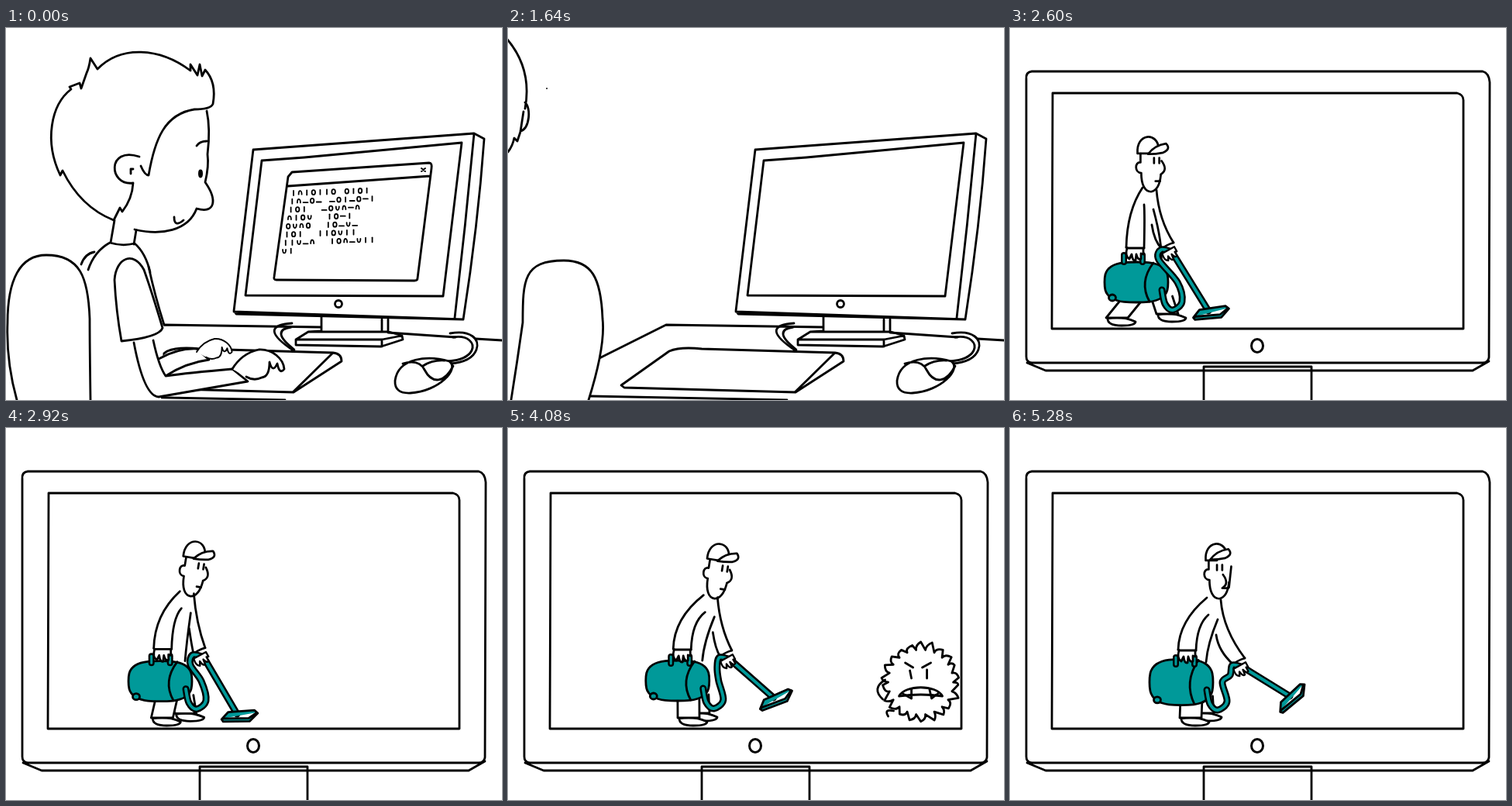
An HTML page with a canvas that plays this animation: 640 by 480 pixels, repeating every 5800 ms.

```html
<!DOCTYPE html>
<html lang="en">
<head>
<meta charset="utf-8">
<title>Cleaning the screen</title>
<style>
  html, body { margin: 0; width: 100%; height: 100%; overflow: hidden; background: #fff; }
  canvas { display: block; width: 640px; height: 480px; }
</style>
</head>
<body>
<canvas id="stage" width="640" height="480"></canvas>
<script>
const ctx = document.getElementById('stage').getContext('2d');
const LOOP = 5800, TEAL = '#009999', INK = '#000', PAPER = '#fff';

const span = (t, a, b) => Math.max(0, Math.min(1, (t - a) / (b - a)));
const ease = k => k * k * (3 - 2 * k);
const lerp = (a, b, k) => Array.isArray(a) ? a.map((v, i) => lerp(v, b[i], k)) : a + (b - a) * k;
const blend = (a, b, k) =>
  Object.fromEntries(Object.keys(a).map(key => [key, lerp(a[key], b[key], k)]));
const at = (p, dx, dy) => [p[0] + dx, p[1] + dy];
const seeded = n => Math.abs(Math.sin(n * 127.1) * 43758.5) % 1;

// ---- Drawing helpers ----

function paint(path, fill, width = 2.8, color = INK) {
  if (fill) { ctx.fillStyle = fill; ctx.fill(path); }
  if (!width) return;
  ctx.lineWidth = width;
  ctx.strokeStyle = color;
  ctx.stroke(path);
}
const ink = (d, ...style) => paint(new Path2D(d), ...style);
const bend = (a, control, b) => ink(`M${a} Q${control} ${b}`);

function smooth(pts, closed) {
  const path = new Path2D(), n = pts.length;
  const get = i => closed ? pts[(i + n) % n] : pts[Math.max(0, Math.min(n - 1, i))];
  path.moveTo(...pts[0]);
  for (let i = 0; i < (closed ? n : n - 1); i++) {
    const [a, b, c, d] = [-1, 0, 1, 2].map(j => get(i + j));
    path.bezierCurveTo(b[0] + (c[0] - a[0]) / 6, b[1] + (c[1] - a[1]) / 6,
      c[0] - (d[0] - b[0]) / 6, c[1] - (d[1] - b[1]) / 6, ...c);
  }
  return path;
}
function oval(x, y, rx, ry, ...style) {
  const path = new Path2D();
  path.ellipse(x, y, rx, ry, 0, 0, 7);
  paint(path, ...style);
}
function tube(path, width = 9) {
  paint(path, null, width);
  paint(path, null, width - 5, TEAL);
}
function place([x, y], draw, angle = 0, sx = 1, sy = sx) {
  ctx.save();
  ctx.translate(x, y);
  ctx.rotate(angle);
  ctx.scale(sx, sy);
  draw();
  ctx.restore();
}
function zoomAbout(k, x, y) {
  ctx.translate(x, y);
  ctx.scale(k, k);
  ctx.translate(-x, -y);
}

// ---- Desk ----

function desk() {
  ink('M118 426 L204 383 L406 386 M493 393 L580 399 M606 401 L640 403 M106 475 L360 480');
  ink('M319 157 L604 136 L617 143 Q609 255 590 376 L297 369 L294 365 Z M604 136 Q593 255 579 374 M294 366 L590 376');
  ink('M330 171 L385 167 L588 148 L564 346 L309 345 Z');
  oval(429, 356, 4.5, 4.5);
  ink('M407 373 V391 M485 376 V391 M493 376 V392 M407 391 L390 392 L374 402 V409 L484 411 L512 402 L511 397 L494 392 H392 M374 402 H485 V411 M485 402 L511 397');
  bend([369, 381], [322, 384], [372, 417]);
  bend([368, 386], [340, 390], [372, 415]);
  ink('M146 461 L208 417 Q222 411 250 414 L422 419 Q433 420 433 430 L371 470 L150 464 Z M422 419 L370 470', PAPER);
  ink('M573 394 C600 389 612 402 607 415 Q601 431 573 433 M577 399 C597 396 605 407 601 416 Q595 428 571 430');
  ink('M502 455 C506 425 545 422 572 430 C586 440 558 469 522 471 Q501 472 502 455 Z M512 433 Q533 427 540 441 C550 460 566 458 577 436 M538 436 Q550 428 566 429', PAPER);
}

const ROWS = ['InIoIIo oIoI', 'In_o_ _oI_o-I', 'IoI  _oun-n', 'nIou  Io-I', 'ouno  Io_u_',
  'IoI  IIouII', 'IIu_n  Ion_uII', 'uIoI  o_  I', 'oI_oo  III  Io'];
const MARKS = {
  I: 'M0 -3 V3', o: 'M0 -3 C3 -3 3 3 0 3 C-3 3 -3 -3 0 -3',
  n: 'M-2 2 C-2 -4 2 -4 2 2', u: 'M-2 -2 C-2 4 2 4 2 -2', _: 'M-3 2 H3', '-': 'M-3 0 H3'
};
function codeWindow(t) {
  if (t >= 1240) return;
  ctx.save();
  zoomAbout(1 + 0.09 * span(t, 1080, 1200), 450, 250);
  ink('M369 186 L546 174 Q550 174 549 181 L531 323 Q531 326 527 326 L349 325 Q345 325 346 321 L364 192 Z M364 204 L547 191', PAPER);
  ink('M536 181 L541 185 M541 181 L536 185', null, 2);
  let left = ROWS.slice(0, 7).join('').length + 2 + Math.floor(23 * span(t, 80, 640));
  ROWS.forEach((row, r) => [...row].forEach((ch, i) => {
    if (left-- > 0 && ch !== ' ')
      place([371 - 1.7 * r + 8.6 * i, 213 + 10.7 * r - 0.3 * i], () => ink(MARKS[ch], null, 1.8));
  }));
  ctx.restore();
}

function boyHead() {
  ink('M139 248 Q96 231 73 184 L70 190 C49 146 58 99 84 79 L82 76 L95 71 L97 78 L104 58 Q107 52 109 39 L118 53 C148 22 198 25 238 55 L238 47 L247 61 L250 47 L253 62 L257 54 Q272 70 267 98 Q264 105 243 105 C205 111 192 143 184 190 Q179 190 174 178');
  ink('M172 166 C130 152 132 204 164 200 Q163 220 150 237 L147 232 L139 248 M164 182 H161 V188');
  ink('M259 107 Q264 130 260 163 Q262 178 257 199 C273 222 270 240 246 233 C235 262 200 268 166 260');
  ink('M246 152 Q250 146 259 146 M217 244 Q217 258 229 248');
  oval(251, 188, 1.6, 4, INK);
}
function hand() {
  ink('M0 0 Q12 -20 34 -25 C52 -26 66 -13 67 0 Q61 8 58 -7 Q52 6 48 -9 Q48 10 38 11 Q28 16 18 10', PAPER);
}
const REACH = { head: [0, 0], shirt: [0, 0], sleeve: [0, 0], wrist: [292, 440], bendHand: 0 };
const PRESS = { head: [-13, 0], shirt: [-6, -1], sleeve: [-1, 3], wrist: [287, 420], bendHand: 0.3 };

function boy(t) {
  const lean = ease(span(t, 760, 960)), pose = blend(REACH, PRESS, lean);
  const tap = t >= 80 && t < 640 && Math.floor(t / 80) % 2 ? 4 : 0;
  const wrist = at(pose.wrist, 0, tap);
  ink('M106 312 L134 277 H166 L184 308 L204 383 L200 480 H100 Z', PAPER, 0);
  place(pose.shirt, () => {
    ink('M106 312 Q114 288 134 277 Q150 282 166 278 Q180 290 186 315 M97 305 Q102 291 114 289 M140 248 L135 277 M168 261 L165 279');
  });
  bend([184, 308], [192, 345], [204, 383]);
  if (lean < 0.5) {
    ink('M197 427 Q222 413 246 414 L262 428 Q232 432 206 449', PAPER);
    place([246, 418 - tap], hand, 0, 0.68);
  } else {
    bend([200, 424], [222, 412], [285, 415]);
    ink('M332 447 L340 437 H359 L351 448 Z', INK, 1);
  }
  ink(`M165 406 Q178 475 197 476 Q250 467 ${at(wrist, 20, 16)} L${wrist} Q235 445 206 449 Q197 436 190 403`, PAPER);
  place(wrist, hand, pose.bendHand);
  place(pose.sleeve, () =>
    ink('M149 404 Q142 365 140 325 C142 296 165 287 178 312 Q188 340 202 387 Q198 399 149 404 Z', PAPER));
  place(at(pose.head, tap / 2, 0), boyHead);
}
function leavingBoy() {
  ink('M-5 10 Q32 50 22 104 M22 96 C30 103 28 130 16 133 M20 108 L16 134 L12 146 L8 142 Q6 152 0 160 M-8 160 V480');
}
function chair(k) {
  const left = lerp(2, 19, k), right = lerp(108, 122, k), top = lerp(293, 300, k);
  ink(`M${lerp(14, 4, k)} 480 Q${lerp(0, 12, k)} 430 ${left} 380
    C${left} 325 ${lerp(18, 20, k)} ${top} ${lerp(52, 72, k)} ${top}
    C${lerp(96, 108, k)} ${top} ${lerp(106, 120, k)} 322 ${right} 375
    Q${lerp(108, 126, k)} 410 ${lerp(109, 104, k)} 480`, PAPER);
}

function deskScene(t) {
  ctx.save();
  const zoom = ease(span(t, 1720, 1960)), go = span(t, 1360, 1520);
  ctx.translate(-135 * zoom, -15 * zoom);
  zoomAbout(1 + 1.1 * zoom, 455, 250);
  desk();
  codeWindow(t);
  if (t < 1520) {
    place([-160 * go, -60 * go], () => boy(t));
  } else if (t < 1720) {
    place([1640 - t, 0], leavingBoy);
    oval(50, 78, 0.5, 0.5, INK, 1);
  }
  chair(go);
  ctx.restore();
}

// ---- Cleaner: a jointed figure ----

const WALK = {
  head: [181, 187], tilt: 0, turn: 0, shoulder: [171, 206], grip: [161, 287], farGrip: [205, 289],
  bag: [163, 328], plump: 1, nozzle: [259, 368], aim: -0.12, foot: [144, 379], farFoot: [209, 374]
};
const STOOP = {
  head: [271, 196], tilt: 0.24, turn: 0, shoulder: [251, 213], grip: [222, 289], farGrip: [274, 299],
  bag: [217, 326], plump: 1, nozzle: [322, 374], aim: 0, foot: [239, 379], farFoot: [252, 373]
};
const AIM = {
  ...STOOP, head: [267, 196], tilt: 0.06, shoulder: [254, 219], grip: [227, 289], farGrip: [294, 299],
  bag: [221, 326], nozzle: [375, 322], aim: -0.88
};
const REST = {
  ...AIM, head: [269, 196], tilt: 0, turn: 1, grip: [228, 290], farGrip: [297, 309],
  bag: [221, 328], plump: 1.14, nozzle: [364, 349], aim: -0.72, farFoot: [255, 373]
};

function cleanerHead(turn) {
  ink('M-13 -26 V-14 C-21 -15 -21 0 -12 0 C-12 16 -7 25 1 25 Q12 23 14 3');
  if (turn > 0.5) ink('M17 -18 L14 10');
  place([-9 * turn, 9 * turn], () => ink('M15 -16 Q24 -4 14 2'));
  place([-7 * turn, 0], () => ink('M5 -20 V-13 M12 -20 V-13'));
  ink('M7 11 L13 11');
  ink('M-17 -26 C-19 -54 10 -54 11 -33 M-17 -26 H-2', PAPER);
  place([-8 * turn, -2 * turn], () =>
    ink('M-3 -25 Q6 -37 21 -39 Q28 -32 17 -27 Q8 -25 -3 -25 Z', PAPER));
}
function fist() {
  ink('M-10 -3 Q-13 8 -7 11 L-4 5 Q-3 14 1 13 L2 5 Q4 13 8 11 L8 4 L11 5 V-3 Z', PAPER);
}
function leg(hipX, hipY, foot, half) {
  place(foot, () => ink('M-18 -4 Q0 -8 18 0 Q18 5 0 5 Q-18 5 -18 -4 Z', PAPER));
  ink(`M${hipX - half} ${hipY} L${at(foot, -6 - half, -5)} H${foot[0] - 6 + half} L${hipX + half} ${hipY}`, PAPER);
}
function bagBody(plump) {
  const round = v => Math.sign(v) * Math.abs(v) ** 0.7, rim = [];
  for (let i = 0; i < 24; i++) {
    const a = i * Math.PI / 12;
    rim.push([41 * round(Math.cos(a)), 26 * plump * round(Math.sin(a))]);
  }
  paint(smooth(rim, true), TEAL);
  bend([22, -25 * plump], [3, 0], [17, 25 * plump]);
  oval(-31, 20 * plump, 4.5, 4, TEAL);
}

function cleaner(p) {
  const { shoulder, grip, farGrip, bag, nozzle } = p;
  const front = at(shoulder, 18, 3), port = at(bag, 33, 10);
  leg((bag[0] + 25 + p.farFoot[0] - 6) / 2, bag[1] + 18, p.farFoot, 14);
  leg((bag[0] + 14 + p.foot[0] - 6) / 2, bag[1] + 22, p.foot, 14);

  const cuff = at(grip, -11, -4), innerCuff = at(grip, 12, -3);
  bend(shoulder, at([cuff[0], shoulder[1]], 1, 30), cuff);
  bend(at(shoulder, 2, 22), at([innerCuff[0], shoulder[1]], 1, 35), innerCuff);
  bend(cuff, at(grip, 0, 4), innerCuff);
  const farCuff = at(farGrip, 6, -12), farInner = at(farGrip, -9, -4);
  bend(front, at(front, 3, 38), farCuff);
  bend(at(front, -6, 45), at(front, -3, 66), farInner);
  bend(farCuff, at(farGrip, -4, -9), farInner);
  bend(at(front, -4, 25), at(bag, 34, -50), at(bag, 32, -26));

  place(bag, () => bagBody(p.plump));
  for (const dx of [-14, 10]) tube(smooth([at(grip, dx, 15), at(grip, dx, 6)]), 8);
  place(grip, fist);
  tube(smooth([port, at(port, 4, 18), at(port, 14, 26), at(port, 26, 15), at(port, 20, -10),
    at(farGrip, -13, 10), at(farGrip, -10, -3), at(farGrip, 4, 0)]));
  tube(smooth([at(farGrip, 4, 0), at(nozzle, -3, -3)]));
  place(nozzle, () =>
    ink('M-23 3 L-14 -6 L20 -7 L24 -3 L13 7 L-21 6 Z M-21 2 L12 3 L23 -4', TEAL), p.aim);
  place(farGrip, fist, -0.5, 0.85);
  place(p.head, () => cleanerHead(p.turn), p.tilt, 0.97);
}

function cleanerPose(t) {
  if (t >= 5080) return blend(AIM, REST, ease(span(t, 5080, 5280)));
  if (t >= 3840) return blend(STOOP, AIM, ease(span(t, 3840, 4360)));
  const pose = blend(WALK, STOOP, span(t, 2600, 3080));
  if (t < 2600) {
    const swing = 33 * (1 - Math.cos((2600 - t) * Math.PI / 260));
    pose.foot = at(pose.foot, swing, 0);
    pose.farFoot = at(pose.farFoot, -swing, 0);
  }
  return pose;
}

// ---- Monster ----

function fur(rx, ry, depth) {
  const spikes = 22, step = Math.PI * 2 / spikes;
  const ring = (a, r) => [(rx + r) * Math.cos(a), (ry + r) * Math.sin(a)];
  let d = `M${ring(0, 0)}`;
  for (let i = 0; i < spikes; i++) {
    const tip = (i + 0.5 + 0.5 * (seeded(i) - 0.5)) * step;
    d += `Q${ring(i * step, depth * 0.7)} ${ring(tip, depth * (0.7 + 0.6 * seeded(i + 40)))}`
      + `L${ring((i + 1) * step, 0)}`;
  }
  ink(d + 'Z', PAPER);
}
function monsterBody(squash) {
  fur(42, lerp(42, 49, squash), lerp(9, 4, squash));
  place([4 * squash, -7 * squash], () =>
    ink('M-20 -25 L-10 -19 M13 -25 L2 -19 M-14 -15 L-12 -5 M8 -16 V-5'),
    0, 1, lerp(1, 1.4, squash));
  place([2 * squash, 4 * squash], () =>
    ink('M-28 18 C-20 3 20 3 28 18 Q0 14 -28 18 M-23 15 L-12 21 V9 M11 8 L14 21 L23 14', PAPER),
    -0.12 * squash, lerp(1, 1.15, squash), lerp(1, 1.3, squash));
  if (squash < 0.5) ink('M-46 -3 Q-64 8 -49 22 M-35 37 Q-48 34 -42 44');
  else ink('M34 37 L45 46');
}
function monster(t) {
  if (t < 3160 || t >= 4920) return;
  const squash = span(t, 4520, 4640), gone = ease(span(t, 4640, 4920));
  let x = 552 + 100 * (1 - span(t, 3160, 3440)) - 10 * span(t, 3480, 3640) - 22 * span(t, 3840, 4400);
  x = lerp(x, 418, ease(span(t, 4440, 4640)));
  ctx.save();
  zoomAbout(1 - gone, 376, 323);
  place([x, 328 - 2 * squash], () => monsterBody(squash));
  ctx.restore();
}

function screenScene(t) {
  ctx.save();
  zoomAbout(1.02 - 0.02 * span(t, 1960, 2080), 320, 250);
  ink('M21 66 Q20 57 28 56 H610 Q618 58 619 70 L618 425 Q617 432 610 432 H28 Q21 431 21 424 Z M22 432 L46 442 H597 L618 430');
  ink('M55 84 H577 Q585 86 585 93 V388 H54 Z');
  oval(319, 410, 7.5, 8.5, null, 3);
  ink('M250 490 V437 H389 V490');
  ctx.beginPath();
  ctx.rect(55, 84, 529, 303);
  ctx.clip();
  monster(t);
  if (t >= 2080) place([-240 * (1 - span(t, 2080, 2600)), 0], () => cleaner(cleanerPose(t)));
  ctx.restore();
}

function frame() {
  const t = Math.floor(performance.now() % LOOP / 40) * 40;
  ctx.fillStyle = PAPER;
  ctx.fillRect(0, 0, 640, 480);
  ctx.lineCap = ctx.lineJoin = 'round';
  (t < 1960 ? deskScene : screenScene)(t);
  requestAnimationFrame(frame);
}
frame();
</script>
</body>
</html>
```
